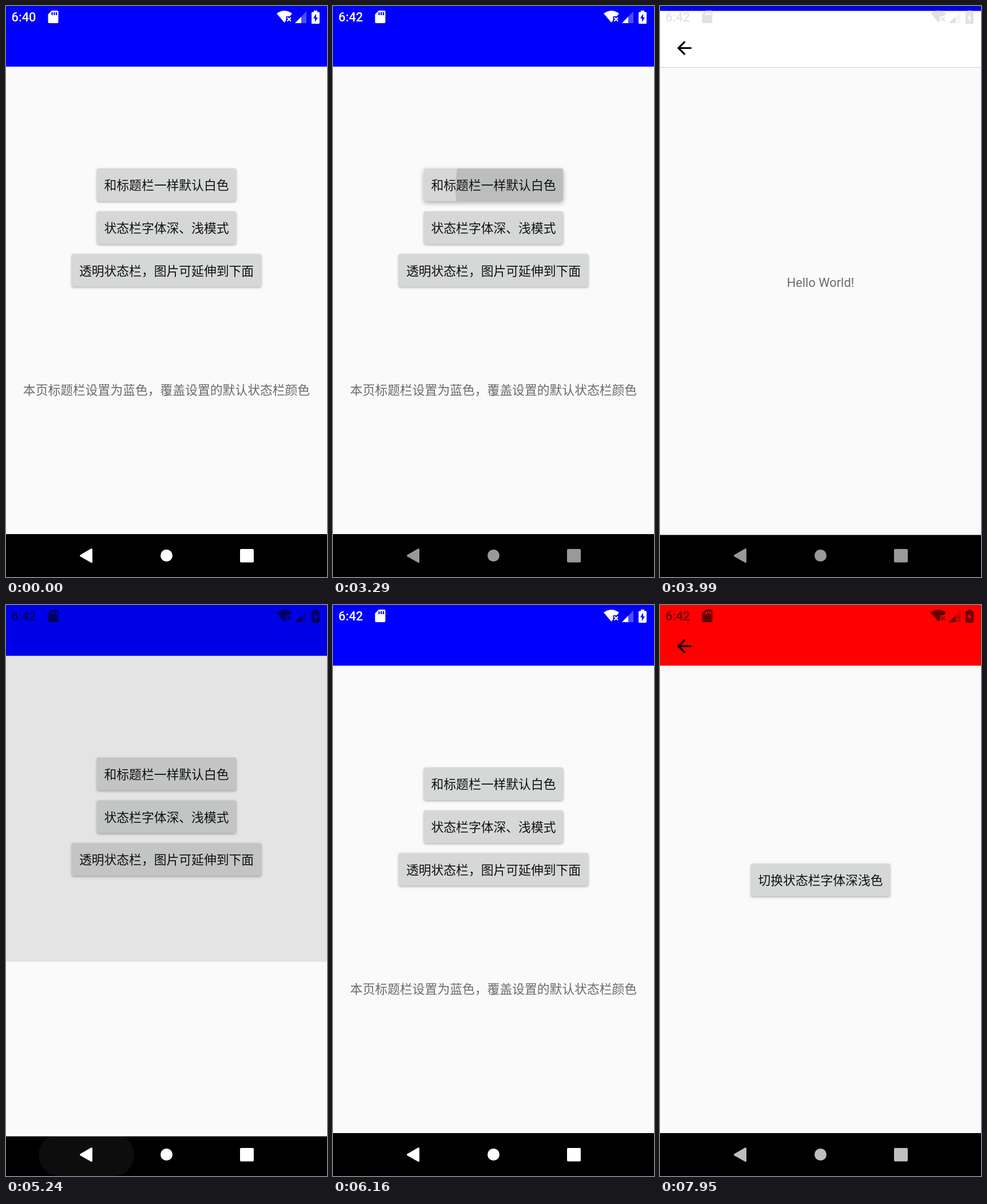
These frames come from a looping animation (561 px wide and 998 px high, 7990 ms). An HTML page with a canvas:

```html
<!DOCTYPE html>
<html lang="zh-CN">
<head>
<meta charset="utf-8">
<style>
html, body { margin: 0; width: 100%; height: 100%; overflow: hidden; background: #000; }
canvas { display: block; }
</style>
</head>
<body>
<canvas id="stage" width="561" height="998"></canvas>
<script>
const W = 561, H = 998, LOOP = 7990, MOVE = 425, NAV_TOP = 923;
const ctx = document.getElementById('stage').getContext('2d');
const CJK = '21.8px "Noto Sans CJK SC", "Noto Sans CJK", sans-serif';
const LATIN = '21.8px Roboto, sans-serif';

const mix = (a, b, k) => a + (b - a) * k;
const ramp = (t, start, length) => Math.min(1, Math.max(0, (t - start) / length));

// y at x on a cubic curve
function curve(x, ax, ay, bx, by, cx, cy, dx, dy) {
  const at = (u, a, b, c, d) => {
    const v = 1 - u;
    return a * v * v * v + 3 * b * u * v * v + 3 * c * u * u * v + d * u * u * u;
  };
  let lo = 0, hi = 1;
  for (let i = 0; i < 30; i++) {
    const mid = (lo + hi) / 2;
    if (at(mid, ax, bx, cx, dx) < x) lo = mid; else hi = mid;
  }
  return at(lo, ay, by, cy, dy);
}
const slideEase = x => curve(x, 0, 0, .4, 0, .2, 1, 1, 1);
const dimEase = x => curve(x, 0, 0, .33, 0, 1, 1, 1, 1);
const wipeEase = x => x < 1 / 6
  ? curve(x, 0, 0, .05, 0, .13333, .06, 1 / 6, .4)
  : curve(x, 1 / 6, .4, .20833, .82, .25, 1, 1, 1);

function rect(x, y, w, h, color) {
  ctx.fillStyle = color;
  ctx.fillRect(x, y, w, h);
}

function round(x, y, w, h, r) {
  ctx.beginPath();
  ctx.roundRect(x, y, w, h, r);
}

function label(text, y, color, font = CJK) {
  ctx.font = font;
  ctx.textAlign = 'center';
  ctx.fillStyle = color;
  ctx.fillText(text, 280.5, y);
}

// ripple: { x, r, strength }
function button(text, y, w, ripple = { strength: 0 }) {
  const x = 280.5 - w / 2, s = ripple.strength;
  ctx.save();
  ctx.shadowColor = 'rgba(0,0,0,.32)';
  ctx.shadowBlur = 4 + 5 * s;
  ctx.shadowOffsetY = 1.5 + 1.5 * s;
  ctx.fillStyle = '#d6d7d7';
  round(x, y, w, 57, 3);
  ctx.fill();
  ctx.restore();
  if (s > 0) {
    ctx.save();
    ctx.clip();
    ctx.beginPath();
    ctx.arc(ripple.x, y + 32, ripple.r, 0, 7);
    ctx.fillStyle = `rgba(0,0,0,${.12 * s})`;
    ctx.fill();
    ctx.restore();
  }
  label(text, y + 37, '#111');
}

function page(bar) {
  rect(0, 0, W, H, '#fafafa');
  rect(0, 0, W, 106, bar);
  rect(0, NAV_TOP, W, H, '#000');
}

const arrow = new Path2D('M20 11H7.83l5.59-5.59L12 4l-8 8 8 8 1.41-1.41L7.83 13H20v-2z');
function backArrow() {
  ctx.save();
  ctx.translate(23.8, 53.3);
  ctx.scale(1.558, 1.558);
  ctx.fillStyle = '#000';
  ctx.fill(arrow);
  ctx.restore();
}

function homePage(t) {
  const grow1 = ramp(t, 3290, 120), grow2 = ramp(t, 6270, 150);
  page('#00f');
  button('和标题栏一样默认白色', 284, 243, {
    x: mix(344, 280.5, grow1), r: mix(130, 127, grow1),
    strength: t < 3290 ? 0 : 1 - ramp(t, 3500, 160)
  });
  button('状态栏字体深、浅模式', 359, 243, {
    x: 280.5, r: mix(40, 127, grow2),
    strength: ramp(t, 6270, 60) - ramp(t, 6420, 110)
  });
  button('透明状态栏，图片可延伸到下面', 433.5, 331);
  label('本页标题栏设置为蓝色，覆盖设置的默认状态栏颜色', 679, '#6b6b6b');
}

function whitePage() {
  page('#fff');
  rect(0, 105.5, W, 1, '#cfcfcb');
  backArrow();
  label('Hello World!', 490, '#6b6b6b', LATIN);
}

function redPage() {
  page('#f00');
  backArrow();
  button('切换状态栏字体深浅色', 452, 243);
}

// slide and wipe: 0 = top page hidden, 1 = fully shown
function stack(t, slide, wipe, dim, topPage) {
  rect(0, 0, W, H, '#000');
  ctx.save();
  ctx.translate(0, -.02 * H * slide);
  homePage(t);
  rect(0, 0, W, H, `rgba(0,0,0,${.1 * dim})`);
  ctx.restore();
  if (wipe <= 0) return;
  ctx.save();
  ctx.translate(0, .041 * H * (1 - slide));
  ctx.beginPath();
  ctx.rect(0, .959 * H * (1 - wipe), W, H);
  ctx.clip();
  topPage();
  ctx.restore();
}

function open(t, start, topPage) {
  const k = ramp(t, start, MOVE);
  stack(t, slideEase(k), wipeEase(k), ramp(t, start, 117), topPage);
}

function close(t, start, topPage) {
  const k = ramp(t, start, MOVE);
  if (k === 1) homePage(t);
  else stack(t, 1 - slideEase(k), 1 - wipeEase(k), 1 - dimEase(k), topPage);
}

const card = new Path2D('M80 8H89.5Q91.500 8 91.500 10V28Q91.500 30 89.500 30H75.500Q73.500 30 73.500 28V14.500Z' +
  'M79.500 11V16H81.700V11ZM83.300 11V16H85.500V11ZM87 11V16H89.200V11Z');
const wifi = new Path2D('M473 13Q486.500 3.500 500 13L496 18H489.500V25L486.500 29Z');
const cross = new Path2D('M491.500 20L498 26.500M498 20L491.500 26.500');
const signal = new Path2D('M505 30L525 9.500V30Z');
const signalOn = new Path2D('M505 30L516 18.700V30Z');
const battery = new Path2D('M538 8H544V10.500H546.500Q548 10.500 548 12V29.500Q548 31 546.500 31H535.500Q534 31 534 29.500V12Q534 10.500 535.500 10.500H538Z' +
  'M542 13.500L537 21.500H540V28L545 20H542Z');

function statusBar(t) {
  const dark = ramp(t, 3972, 160) - ramp(t, 5460, 120) + ramp(t, 7164, 160);
  const alpha = 1 - .4 * dark, grey = 255 * (1 - dark);
  const color = `rgb(${grey},${grey},${grey})`;
  const change = ramp(t, 70, 1720);
  ctx.save();
  ctx.globalAlpha = alpha;
  ctx.fillStyle = ctx.strokeStyle = color;
  ctx.lineWidth = 2;
  ctx.textAlign = 'left';
  ctx.font = '500 ' + LATIN;
  ctx.fillText('6:4', 9.5, 27);
  const end = 9.5 + ctx.measureText('6:4').width;
  ctx.globalAlpha = alpha * (1 - change);
  ctx.fillText('0', end, 27);
  ctx.globalAlpha = alpha * change;
  ctx.fillText('2', end, 27);
  ctx.globalAlpha = alpha;
  for (const icon of [card, wifi, signalOn, battery]) ctx.fill(icon, 'evenodd');
  ctx.stroke(cross);
  ctx.globalAlpha = alpha * .3;
  ctx.fill(signal);
  ctx.restore();
}

const backKey = new Path2D('M130 959.300L148.500 948.500Q151 947.500 151 950V971.500Q151 974 148.500 972.800L130 962.200Q128 960.800 130 959.300Z');

function navBar(t) {
  const press = ramp(t, 4780, 120) - ramp(t, 5300, 250);
  if (press > 0) {
    ctx.fillStyle = `rgba(255,255,255,${.05 * press})`;
    round(57, 925, 167, 73, 36);
    ctx.fill();
  }
  ctx.save();
  ctx.globalAlpha = 1 - .4 * ramp(t, 70, 1720) + .4 * ramp(t, 4780, 120) - .25 * ramp(t, 7600, 350);
  ctx.fillStyle = '#fff';
  ctx.fill(backKey);
  ctx.beginPath();
  ctx.arc(280.5, 960.5, 10.5, 0, 7);
  ctx.fill();
  round(409, 949, 24, 23.5, 2);
  ctx.fill();
  ctx.restore();
}

function draw(t) {
  if (t < 3667) homePage(t);
  else if (t < 5155) open(t, 3667, whitePage);
  else if (t < 6859) close(t, 5155, whitePage);
  else open(t, 6859, redPage);
  navBar(t);
  statusBar(t);
}

const begin = performance.now();
function tick() {
  draw((performance.now() - begin) % LOOP);
  requestAnimationFrame(tick);
}
tick();
</script>
</body>
</html>
```
